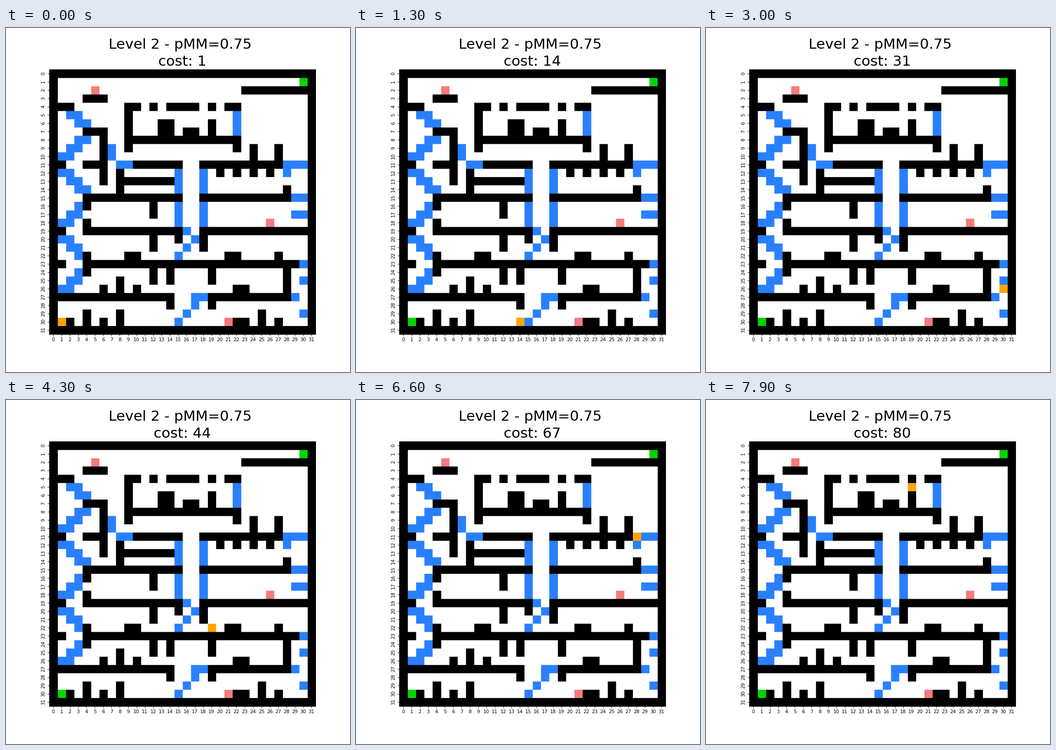
These frames come from a looping animation (748x748 px, 8 s). A matplotlib script:

```python
import matplotlib.pyplot as plt
import numpy as np
from matplotlib.animation import FuncAnimation
from matplotlib.colors import to_rgb

N = 32
STEPS = 80
SIZE = 748
FREE, WALL, LADDER, TRAP, END, AGENT = range(6)
PALETTE = np.array([to_rgb(c) for c in (
    "white", "black", "#2980ff", "#f67b7b", "#00d500", "#ffa500")])

level = np.full((N, N), FREE)


def floor(row, first, last):
    level[row, first:last + 1] = WALL


def hang(row, depth, *cols):
    """Pillars below the floor at this row."""
    for c in cols:
        level[row + 1:row + 1 + depth, c] = WALL


def stand(row, height, *cols):
    """Pillars on top of the floor at this row."""
    for c in cols:
        level[row - height:row, c] = WALL


def build_ladders():
    # zigzag stairs along the left side
    for middle in (7, 15, 23):
        for d in (1, 2, 3):
            level[[middle - d, middle + d], 4 - d:6 - d] = LADDER
    # ropes and stairs in the middle
    level[12:19, [15, 18]] = LADDER
    for row in range(19, 23):
        level[row, 17 - abs(row - 20)] = LADDER
    for row in range(27, 31):
        level[row, 45 - row] = LADDER
    level[27, 17] = LADDER
    level[5:8, 22] = LADDER
    level[9:11, 7] = level[11, 8:10] = LADDER
    # steps along the right side
    level[11, 28:31] = level[12, 28] = LADDER
    level[15:18:2, 29:31] = LADDER
    for row in range(23, 30, 2):
        level[row, 30 - (row == 27)] = LADDER


def build_walls():
    level[[0, -1]] = WALL
    level[:, [0, -1]] = WALL
    for row in (4, 11, 19, 23):
        floor(row, 1, 2 if row == 4 else 1)
    for row in (3, 7, 11):
        floor(row, 4, 6)
    floor(2, 23, 30)

    # castle with mirrored battlements
    for c in (9, 10, 12, 14, 15):
        level[4, [c, 31 - c]] = WALL
    floor(8, 9, 22)
    stand(8, 2, 13, 14, 19)
    stand(8, 1, 16, 17)
    hang(4, 5, 9)
    hang(8, 1, 22)

    floor(11, 10, 15)
    floor(11, 18, 27)
    stand(11, 2, 24, 27)
    hang(11, 1, *range(20, 27, 2))
    hang(7, 6, 6)
    hang(11, 3, 8)
    floor(13, 8, 14)

    for row, right in ((15, 28), (19, 30)):
        floor(row, 4, 15)
        floor(row, 18, right)
    floor(23, 4, 29)
    for row in (15, 19, 23):
        hang(row, 2, 12)
    hang(15, 1, 4)
    stand(15, 1, 28)
    stand(19, 1, 4)
    hang(19, 1, 15)
    hang(19, 2, 18)
    stand(23, 1, 4, 9, 10, 21, 22, 27)
    hang(23, 1, 4)
    hang(23, 2, 14, 19)
    hang(23, 3, 28)

    floor(27, 1, 14)
    floor(27, 19, 28)
    stand(27, 1, 6, 10, 22, 23)
    stand(27, 2, 8)
    hang(27, 1, 14, 19)
    stand(31, 1, 2, 6, 22, 23, 27)
    stand(31, 2, 4, 8, 25)


def make_path():
    """Straight legs between key points, climbing over whatever is in the way."""
    legs = np.array([
        (0, 30, 1), (18, 30, 19), (27, 30, 29), (28, 29, 30), (29, 27, 29),
        (30, 26, 30), (34, 22, 30), (36, 22, 29), (43, 22, 19), (45, 22, 17),
        (49, 18, 17), (51, 16, 19), (53, 16, 21), (55, 18, 24), (57, 17, 26),
        (60, 17, 29), (63, 14, 30), (66, 11, 28), (69, 8, 28), (73, 8, 24),
        (76, 5, 22), (79, 5, 19)])
    path = []
    for i in range(STEPS):
        row, col = (int(np.interp(i, legs[:, 0], v) + 0.5) for v in legs.T[1:])
        while level[row, col] in (WALL, TRAP):
            row -= 1
        path.append((row, col))
    return path


build_ladders()
build_walls()
level[[2, 18, 30], [5, 26, 21]] = TRAP
level[[1, 30], [30, 1]] = END
path = make_path()

# fine sampling of the cells, so their edges come out smooth
ROWS = np.arange(770) * N // 770
COLS = np.arange(775) * N // 775


def paint(grid):
    return PALETTE[grid[np.ix_(ROWS, COLS)]]


fig, ax = plt.subplots(figsize=(10, 10), dpi=SIZE / 10)
fig.subplots_adjust(left=0.125, right=0.9, bottom=0.11, top=0.88)
image = ax.imshow(paint(level), extent=(-0.5, N - 0.5, N - 0.5, -0.5),
                  aspect="auto", interpolation="hanning")
ax.set_xticks(range(N))
ax.set_yticks(range(N), range(N), rotation="vertical", va="center")


def heading(y, text):
    return fig.text(0.5125, 1 - y / SIZE, text, size=30, ha="center",
                    va="baseline")


heading(45, "Level 2 - pMM=0.75 ")
cost = heading(82, "")


def update(i):
    grid = level.copy()
    grid[path[i]] = AGENT
    image.set_data(paint(grid))
    cost.set_text(f"cost: {i + 1}")
    return image, cost


anim = FuncAnimation(fig, update, frames=STEPS, interval=100, repeat=True,
                     repeat_delay=0)
plt.show()
```
